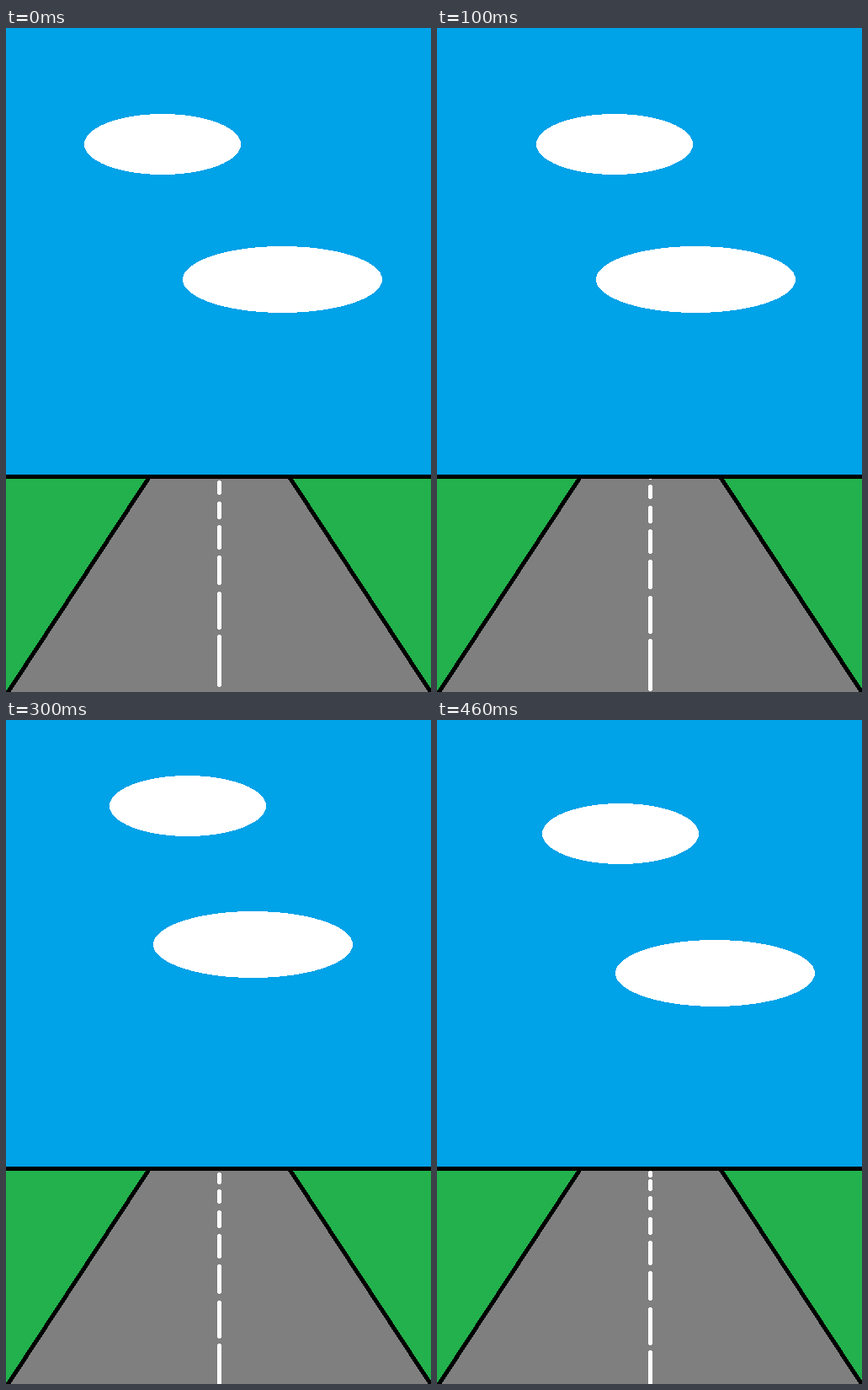
An HTML page that plays this animation: 505 px wide and 788 px high, repeating every 0.5 s.

```html
<!DOCTYPE html>
<html lang="en">
<head>
<meta charset="utf-8">
<title>Road</title>
<style>
  html, body { margin: 0; width: 100%; height: 100%; overflow: hidden; }
  svg { display: block; width: 505px; height: 788px; }
</style>
</head>
<body>
<svg viewBox="0 0 505 788" shape-rendering="crispEdges" stroke-width="5">
  <rect y="530" width="505" height="258" fill="#22b14c"/>
  <path d="M170.5 532.5L2 788H505L336.5 532.5Z" fill="#7f7f7f"/>
  <path d="M170.5 532.5L0.5 791M336.5 532.5L506.5 791" stroke="#000"/>
  <path id="dashes" stroke="#fff" stroke-linecap="round"/>
  <rect width="505" height="531" fill="#00a2e8"/>
  <path d="M0 532.5H505" stroke="#000"/>
  <g fill="#fff">
    <ellipse id="small" rx="93" ry="36"/>
    <ellipse id="large" rx="118.5" ry="39.5"/>
  </g>
</svg>
<script>
const STEP = 100;
const [dashes, small, large] = ['dashes', 'small', 'large'].map(id => document.getElementById(id));

// Top and bottom of each lane dash before the road scrolls
const lane = [[507, 515], [517, 531], [537, 554], [562, 583], [590, 619], [626, 661], [669, 714], [720, 782]];

// One pose per step: road scroll, then the centre of each cloud
const poses = [
  { scroll: 0, small: [186, 138], large: [328.5, 298.5] },
  { scroll: 5, small: [211, 138], large: [307.5, 298.5] },
  { scroll: 12, small: [222, 131], large: [300.5, 282.5] },
  { scroll: 20, small: [216, 102], large: [293.5, 266.5] },
  { scroll: 28, small: [218, 135], large: [330.5, 300.5] }
];

function place(cloud, [x, y]) {
  cloud.setAttribute('cx', x);
  cloud.setAttribute('cy', y);
}

function draw() {
  const pose = poses[Math.floor(performance.now() / STEP) % poses.length];
  place(small, pose.small);
  place(large, pose.large);
  dashes.setAttribute('d', lane.map(([top, bottom]) =>
    `M253.5 ${top + pose.scroll + 2.5}V${bottom + pose.scroll - 2.5}`).join(''));
  requestAnimationFrame(draw);
}
draw();
</script>
</body>
</html>
```
